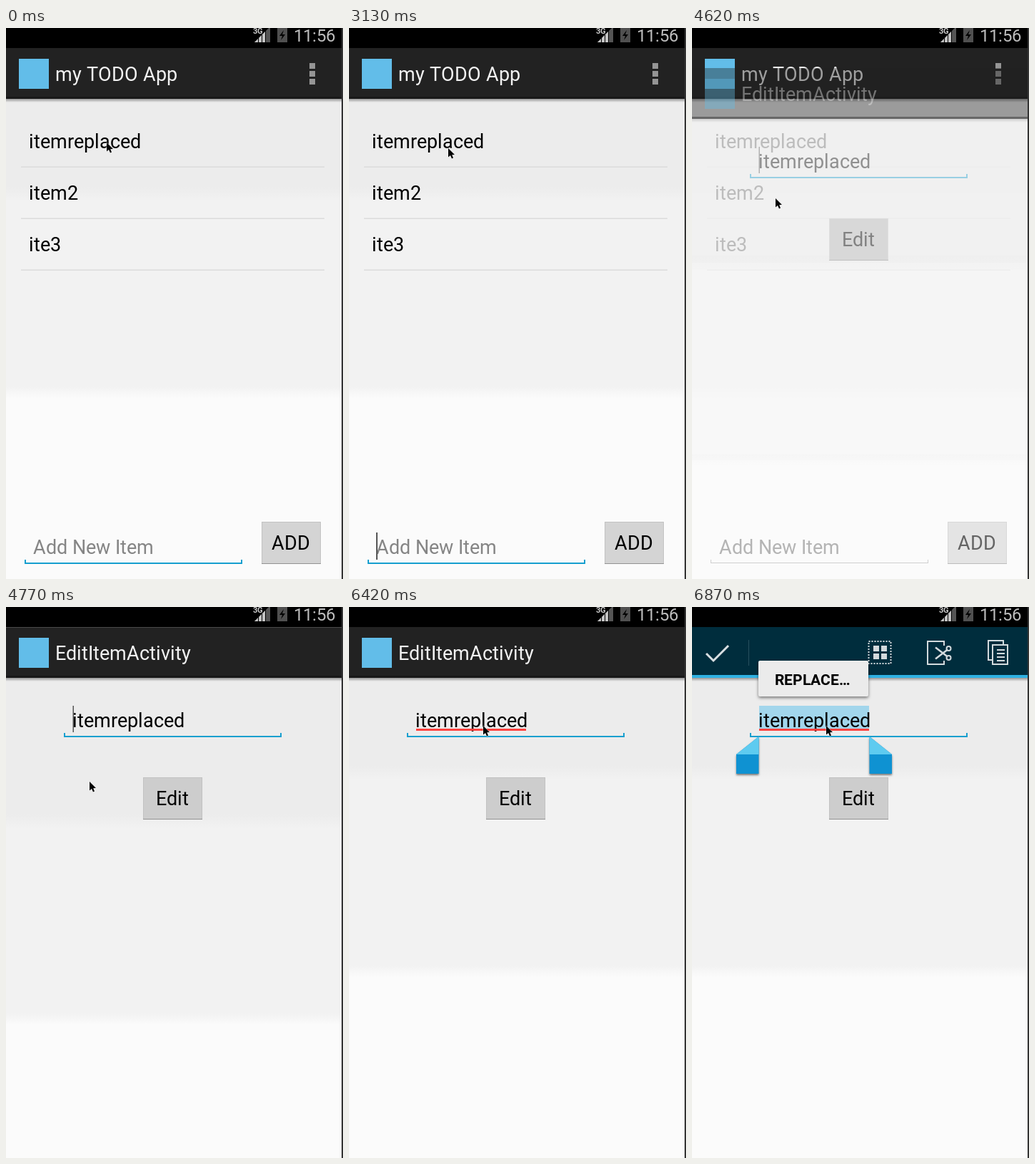
An HTML page with a canvas that plays this animation: 472 px wide and 770 px high, repeating every 8 s.

```html
<!DOCTYPE html>
<html lang="en">
<head>
<meta charset="utf-8">
<title>Todo app</title>
<style>
html, body { margin: 0; width: 100%; height: 100%; overflow: hidden; background: #000; }
canvas { display: block; width: 472px; height: 770px; }
</style>
</head>
<body>
<canvas id="stage" width="472" height="770"></canvas>
<script>
const ctx = document.getElementById('stage').getContext('2d');
const LOOP = 8000;
const STEP = 148.9;   // the screen refreshes in steps of about this many ms
const TICK = 150;     // scene time that passes per step
const BLINK = 510;
const BLUE = '#169fcf', ICON = '#d3dadd';

// scene times of the main events
const BLUR = 4350, OPEN = 4650, SETTLE = 4800, READY = 4950;
const SELECT = 6600, HANDLES = 6750, POPUP = 6900;

// pointer path: time, x, y
const PATH = [
  [1950, 141, 160], [2250, 139, 169], [4200, 139, 167], [4500, 117, 231], [4800, 117, 244],
  [5250, 148, 209], [5400, 148, 209], [5850, 190, 176], [6450, 188, 166]
];

const clamp = v => Math.min(1, Math.max(0, v));
const lerp = (a, b, k) => a + (b - a) * k;
const caretOn = (t, since) => Math.floor((t - since) / BLINK) % 2 === 0;

function pointerAt(t) {
  const last = PATH.length - 1;
  let i = 0;
  while (i < last - 1 && PATH[i + 1][0] <= t) i++;
  const [t0, x0, y0] = PATH[i], [t1, x1, y1] = PATH[i + 1];
  const k = clamp((t - t0) / (t1 - t0));
  return [lerp(x0, x1, k), lerp(y0, y1, k)].map(Math.round);
}

function rect(x, y, w, h, color) {
  ctx.fillStyle = color;
  ctx.fillRect(x, y, w, h);
}

// Glyphs advance by whole pixels, as in hinted text
function text(str, x, y, size = 27, color = '#000', weight = 400) {
  ctx.font = `${weight} ${size}px Roboto, sans-serif`;
  ctx.fillStyle = color;
  for (const ch of str) {
    ctx.fillText(ch, x, y);
    x += Math.round(ctx.measureText(ch).width);
  }
}

function trace(points) {
  ctx.beginPath();
  points.forEach(([x, y]) => ctx.lineTo(x, y));
}

function poly(points, color) {
  trace(points);
  ctx.fillStyle = color;
  ctx.fill();
}

function line(points, color, width) {
  trace(points);
  ctx.strokeStyle = color;
  ctx.lineWidth = width;
  ctx.stroke();
}

function fade(y0, y1, from, to) {
  const g = ctx.createLinearGradient(0, y0, 0, y1);
  g.addColorStop(0, from);
  g.addColorStop(1, to);
  rect(0, y0, 470, y1 - y0, g);
}

function withShadow(blur, paint) {
  ctx.save();
  ctx.shadowColor = 'rgba(0,0,0,.5)';
  ctx.shadowBlur = blur;
  ctx.shadowOffsetY = 2;
  paint();
  ctx.restore();
}

// Three flat bands with soft edges
function backdrop(edge1, edge2) {
  const [top, mid, low] = ['#ececec', '#f2f2f2', '#fbfbfb'];
  rect(0, 99, 470, 671, low);
  rect(0, 99, 470, edge2 - 99, mid);
  rect(0, 99, 470, edge1 - 99, top);
  fade(edge1 - 10, edge1 + 10, top, mid);
  fade(edge2 - 8, edge2 + 8, mid, low);
}

function statusBar() {
  rect(0, 0, 472, 28, '#000');
  poly([[348, 20], [370, 20], [370, -2]], '#555');
  poly([[348, 20], [363, 20], [363, 5]], '#c4c4c4');
  for (let x = 353; x < 368; x += 5) rect(x, 0, 1, 20, '#000');
  rect(345, 0, 14, 9, '#000');
  text('3G', 346, 8, 11, '#ccc', 700);
  rect(380, 0, 14, 20, '#505050');
  poly([[389, 3], [383, 11], [387, 11], [385, 17], [391, 9], [387, 9]], '#000');
  text('11:56', 403, 19, 24, '#bdbdbd');
}

function titleBar(title) {
  rect(0, 28, 470, 71, '#222');
  rect(0, 96, 470, 3, '#191919');
  fade(99, 104, 'rgba(0,0,0,.36)', 'rgba(0,0,0,0)');
  rect(18, 43, 42, 42, '#62bde9');
  text(title, 69, 74, 27, '#f2f2f2');
}

function field(x, y, w, focused) {
  const color = focused ? BLUE : '#b2b2b2';
  const size = focused ? 2 : 1;
  rect(x, y, w, size, color);
  rect(x, y - 4, size, 4, color);
  rect(x + w - size, y - 4, size, 4, color);
}

function button(label, x, y, labelX, color) {
  rect(x, y, 83, 59, '#c2c2c2');
  rect(x + 1, y + 1, 81, 57, color);
  rect(x, y + 58, 83, 1, '#929292');
  text(label, labelX, y + 39);
}

function listScreen(t) {
  const focused = t < BLUR;
  backdrop(232, 509);
  titleBar('my TODO App');
  for (let i = 0; i < 3; i++) rect(425, 49 + 11 * i, 8, 8, '#959595');
  ['itemreplaced', 'item2', 'ite3'].forEach((label, i) => {
    text(label, 32, 168 + 72 * i);
    rect(21, 193.5 + 72 * i, 425, 1.5, '#dcdcdc');
  });
  text('Add New Item', 38, 735, 27, '#858585');
  field(26, 747, 305, focused);
  if (focused && caretOn(t, 90)) rect(38, 705, 2, 38, '#555');
  button('ADD', 358, 690, 372, '#d4d4d4');
}

function editScreen(t) {
  const selected = t >= SELECT;
  if (t < READY) backdrop(300, 576);
  else backdrop(232, 509);
  titleBar('EditItemActivity');
  if (selected) rect(94, 138, 154, 32, '#a2d6ec');
  text('itemreplaced', 93, 168);
  if (t >= READY) rect(94, 170, 154, 3, '#ff4340');
  field(81, 180, 305, true);
  if (!selected && caretOn(t, 4590)) rect(93.5, 138, 1.5, 37, '#555');
  button('Edit', 192, 238, 210, '#cdcdcd');
}

function selectAllIcon() {
  ctx.setLineDash([2, 2]);
  ctx.strokeStyle = ICON;
  ctx.lineWidth = 2;
  ctx.strokeRect(247.5, 48, 31, 31);
  ctx.setLineDash([]);
  for (const x of [254, 265]) for (const y of [54, 65]) rect(x, y, 8, 8, ICON);
}

function cutIcon() {
  line([[353, 54], [353, 48], [330, 48], [330, 80], [353, 80], [353, 75]], ICON, 2);
  for (const side of [-1, 1]) {
    line([[341, 64.5 + 8 * side], [358, 64.5 - 5 * side]], ICON, 2.5);
    ctx.beginPath();
    ctx.arc(359.5, 64.5 + 6.5 * side, 3, 0, 7);
    ctx.lineWidth = 2;
    ctx.stroke();
  }
}

function copyIcon() {
  line([[420, 74], [415, 74], [415, 47], [436, 47], [436, 52]], ICON, 2);
  ctx.strokeRect(421, 53, 21, 27);
  for (let y = 59; y < 75; y += 5) rect(427, y, 11, 2, ICON);
}

// The bar fades in, the check mark slides in, the icons unfold
function actionBar(t) {
  const p = clamp((t - 6550) / 250);
  const shift = -58 * (1 - p);
  ctx.save();
  ctx.beginPath();
  ctx.rect(0, 28, 470, 72);
  ctx.clip();
  ctx.globalAlpha = lerp(0.7, 1, p);
  rect(0, 28, 470, 68, '#002d3d');
  ctx.globalAlpha = lerp(0.5, 1, p);
  rect(0, 95, 470, 4, '#2fb1e3');
  rect(79 + shift, 46, 1, 36, '#27505e');
  ctx.globalAlpha = 1;
  line([[20 + shift, 65], [30 + shift, 75], [51 + shift, 54]], '#d9dfe2', 3);
  ctx.globalAlpha = lerp(0.4, 1, p);
  ctx.translate(0, 64);
  ctx.scale(1, p * p);
  ctx.translate(0, -64);
  selectAllIcon();
  cutIcon();
  copyIcon();
  ctx.restore();
}

function handle(x, dir) {
  const far = x + 31.5 * dir;
  withShadow(3, () => poly([[x, 181], [x, 233], [far, 233], [far, 206]], '#0f92d2'));
  poly([[x, 181], [x, 206], [far, 206]], '#5ecbf0');
}

function popup() {
  withShadow(4, () => {
    ctx.beginPath();
    ctx.roundRect(93, 75, 154, 50, 2);
    ctx.fillStyle = '#ebebeb';
    ctx.fill();
  });
  text('REPLACE…', 116, 109, 21, '#000', 700);
}

function pointer(x, y) {
  ctx.save();
  ctx.translate(x, y);
  const shape = [[0, 0], [0, 12.5], [3, 10], [5, 14.5], [7, 13.5], [5.2, 9.2], [9, 9], [0, 0]];
  line(shape, 'rgba(255,255,255,.75)', 1);
  poly(shape, '#000');
  ctx.restore();
}

function draw(ms) {
  const t = Math.floor(ms / STEP) * TICK;
  const opening = t >= OPEN && t < SETTLE;
  if (t < SETTLE) listScreen(t);
  if (t >= OPEN) {
    ctx.save();
    if (opening) {
      ctx.globalAlpha = 0.4;
      ctx.translate(0, 28);
    }
    editScreen(t);
    ctx.restore();
  }
  if (t >= SELECT) actionBar(t);
  if (t >= HANDLES) {
    handle(93.5, -1);
    handle(248.5, 1);
  }
  if (t >= POPUP) popup();
  statusBar();
  if (t >= SETTLE && t < READY) rect(0, 28, 470, 1, '#4a4a4a');
  rect(470, 0, 2, 770, '#333');
  pointer(...pointerAt(t));
}

function tick(now) {
  draw(now % LOOP);
  requestAnimationFrame(tick);
}
draw(0);
requestAnimationFrame(tick);
</script>
</body>
</html>
```
